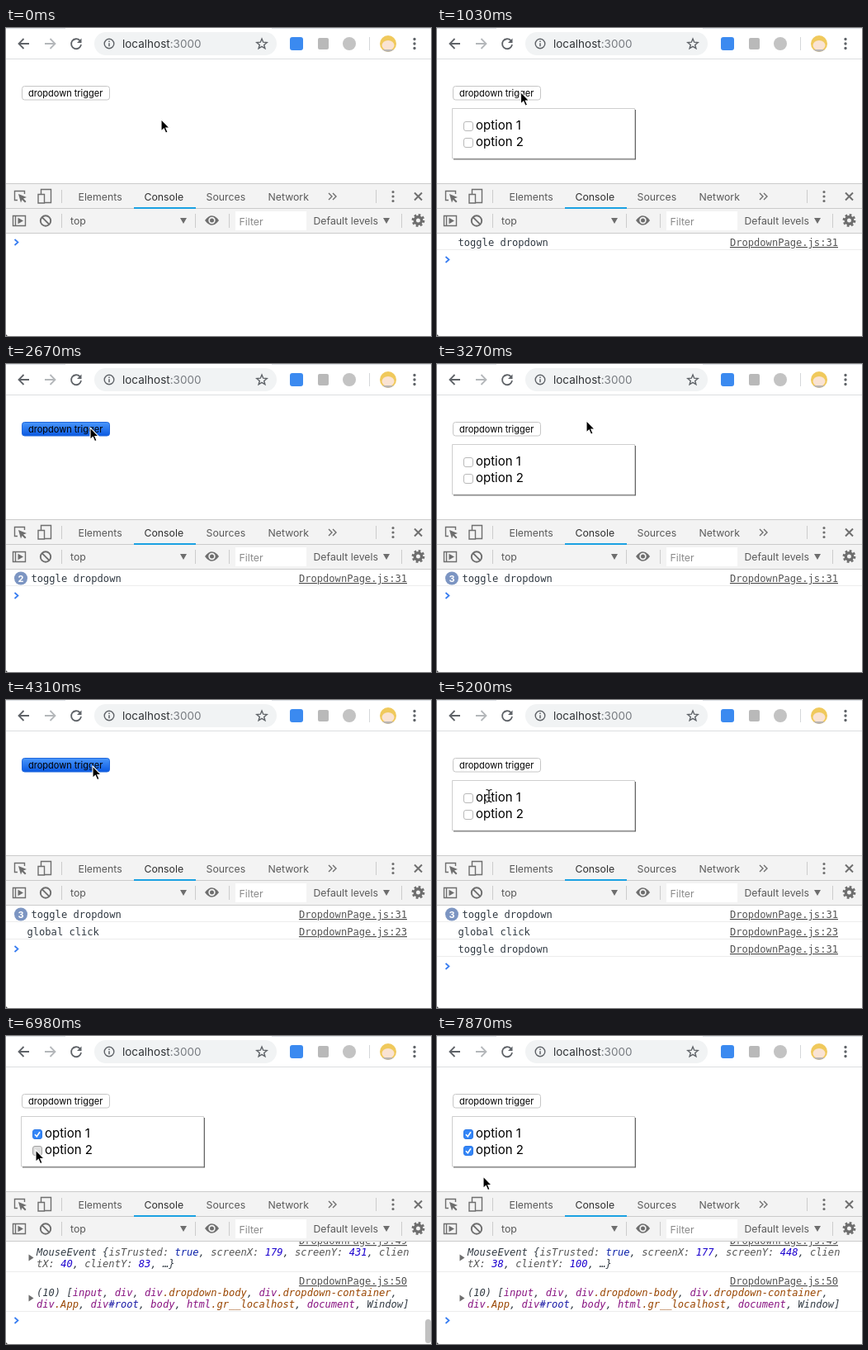
Animation of 515x373 px, one loop 8000 ms. Source, as an HTML page:

```html
<!DOCTYPE html>
<html lang="en">
<head>
<meta charset="utf-8">
<title>Dropdown and console</title>
<style>
  html, body { margin: 0; width: 100%; height: 100%; overflow: hidden; background: #fff; }
  svg { display: block; width: 100vw; height: 100vh; }
  text { white-space: pre; font-family: Inter, Roboto, sans-serif; }
  .ui { font-size: 12.3px; fill: #5a5a5a; }
  .mono, .mono text { font: 12.1px "DejaVu Sans Mono", "Liberation Mono", monospace; fill: #303942; }
  .mono .obj { font-style: italic; }
  .mono .link { fill: #545454; text-anchor: end; text-decoration: underline; }
  .key { fill: #565656; }
  .val { fill: #1c00cf; }
  .bool { fill: #0d22aa; }
  .tag { fill: #881280; }
  .cls { fill: #994500; }
  .id { fill: #1a1aa6; }
  .line { fill: none; stroke: #5f6368; stroke-width: 1.8; }
  .tool { fill: none; stroke: #6e6e6e; stroke-width: 1.4; }
  .solid { fill: #6e6e6e; }
  .sep { stroke: #ccc; }
  .rule { stroke: #ececec; }
</style>
</head>
<body>
<svg viewBox="0 0 515 373" preserveAspectRatio="none">
  <defs>
    <linearGradient id="blue" x2="0" y2="1">
      <stop offset="0" stop-color="#4a97fb"/><stop offset="1" stop-color="#0a59e2"/>
    </linearGradient>
    <filter id="soft" x="-5%" y="-10%" width="110%" height="120%"><feGaussianBlur stdDeviation=".6"/></filter>
    <clipPath id="pane"><path d="M0 249H515V373H0z"/></clipPath>
    <clipPath id="face"><circle cx="463" cy="19" r="10"/></clipPath>
  </defs>
  <rect width="515" height="373" fill="#fff"/>

  <!-- browser bar -->
  <path d="M0 0H72V1H0zM322 0H515V1H322z" fill="#dee1e6"/>
  <path d="M0 37.5H515" stroke="#dcdee0"/>
  <path class="line" d="M28 19H15.5M21.5 13L15.500 19L21.500 25"/>
  <path class="line" d="M47 19H59.500M53.500 13L59.500 19L53.500 25" style="stroke:#b4b7ba"/>
  <path class="line" d="M89.500 15.200A6 6 0 1 0 91 20"/>
  <path d="M91.500 12.500V18H86z" fill="#5f6368"/>
  <rect x="107" y="5" width="221" height="28" rx="14" fill="#f1f3f4"/>
  <circle class="line" cx="125" cy="19" r="5.800" style="stroke-width:1.400"/>
  <path d="M125 18.200V22.200M125 15.500V17" stroke="#5f6368" stroke-width="1.500"/>
  <text x="141" y="24" font-size="13.5" fill="#303336">localhost<tspan fill="#777b80">:3000</tspan></text>
  <path class="line" style="stroke-width:1.400" d="M310 13L311.700 17.200L316.200 17.500L312.700 20.400L313.900 24.800L310 22.400L306.100 24.800L307.300 20.400L303.800 17.500L308.300 17.200z"/>
  <rect x="344" y="11" width="16" height="16" rx="3" fill="#3b8af0"/>
  <rect x="378" y="12" width="13" height="14" rx="2" fill="#b9b9b9"/>
  <circle cx="416" cy="19" r="8" fill="#c3c3c3"/>
  <path d="M440.500 11V27" stroke="#d5d7d9"/>
  <g clip-path="url(#face)">
    <path d="M453 9H473V29H453z" fill="#f0c95c"/>
    <ellipse cx="463" cy="21" rx="7.500" ry="6" fill="#fae3d3"/>
    <path d="M453 26H473V29H453z" fill="#b9b5b3"/>
  </g>
  <path d="M495 13.500V13.510M495 19V19.010M495 24.500V24.510" stroke="#5f6368" stroke-width="3.400" stroke-linecap="round"/>

  <!-- page -->
  <rect id="btn" x="19.500" y="70.500" width="106" height="16.500" rx="3"/>
  <text x="27" y="83" font-size="11" fill="#000">dropdown trigger</text>
  <g id="menu">
    <path d="M20 99H241V159.500H20z" fill="#666" filter="url(#soft)"/>
    <path d="M18.500 97.500H239.500V158H18.500z" fill="#fff" stroke="#cfcfcf"/>
    <g id="boxes"></g>
    <text x="47" y="123" font-size="15">option 1</text>
    <text x="47" y="143" font-size="15">option 2</text>
  </g>

  <!-- panel bars -->
  <path d="M0 188H515V249H0z" fill="#f3f3f3"/>
  <path d="M0 188.500H515M0 218.500H515M0 248.500H515" stroke="#cbcbcb"/>
  <path d="M155 217H230V219H155z" fill="#1ba1e2"/>
  <path class="sep" d="M67.500 196V212M448.500 196V212M67.500 225V242M229.500 225V242M270.500 225V242M479.500 225V242"/>
  <path class="tool" d="M14 208.500H10.500V197.500H22.500V201"/>
  <path class="solid" d="M15 201L25 205L21 206.500L24.500 210L23 211.500L19.500 208L18 211.500z"/>
  <path class="tool" d="M42.500 201V195.500H54.500V211.500H47M39 201.500H46.500V212H39z"/>
  <path class="tool" d="M391 200L395 204L391 208M396 200L400 204L396 208" stroke-width="1.600"/>
  <path d="M469 198.500V198.510M469 204V204.010M469 209.500V209.510" stroke="#6e6e6e" stroke-width="3.200" stroke-linecap="round"/>
  <path class="tool" d="M495 199.500L504 208.500M504 199.500L495 208.500" style="stroke-width:2"/>
  <g class="ui">
    <text x="87.500" y="209">Elements</text>
    <text x="167.500" y="209" fill="#303030">Console</text>
    <text x="242.500" y="209">Sources</text>
    <text x="317.500" y="209">Network</text>
    <text x="78" y="238">top</text>
    <text x="372.500" y="238">Default levels</text>
  </g>
  <path class="tool" d="M8.500 227.500H23.500V239.500H8.500zM11.500 227.500V239.500"/>
  <path class="solid" d="M14.500 229.800L21 233.500L14.500 237.200z"/>
  <g class="tool" style="stroke-width:1.900"><circle cx="48" cy="233.500" r="6.200"/><path d="M43.600 229.100L52.400 237.900"/></g>
  <path class="solid" d="M211 230H219L215 237zM457 230H465L461 237z"/>
  <path class="solid" d="M241 233Q249.500 221.500 258 233Q249.500 244.500 241 233z"/>
  <circle cx="249.500" cy="233" r="4.200" fill="#f3f3f3"/><circle class="solid" cx="249.500" cy="233" r="2.500"/>
  <path d="M278 222H364V245H278z" fill="#fff"/>
  <text class="ui" x="282.500" y="239" style="fill:#8a8a8a">Filter</text>
  <g class="tool"><circle cx="499.500" cy="233" r="4.200" style="stroke-width:3.400"/>
    <circle cx="499.500" cy="233" r="6.600" style="stroke-width:2.600;stroke-dasharray:2.700 2.484"/></g>

  <g id="console" class="mono" clip-path="url(#pane)"></g>
  <path d="M0 371V373H2z" fill="#444"/>
  <path id="arrow" d="M0 0V14.500L3.300 11.500L5.600 16.700L8 15.600L5.800 10.600H10.300z" stroke="#fff" stroke-width="1.100"/>
  <g id="beam" fill="none">
    <path d="M-3.500 -7.500Q0 -7.500 0 -5Q0 -7.500 3.500 -7.500M0 -5V5M-3.500 7.500Q0 7.500 0 5Q0 7.500 3.500 7.500M-2 2.500H2" stroke="#fff" stroke-width="2.600"/>
    <path d="M-3.500 -7.500Q0 -7.500 0 -5Q0 -7.500 3.500 -7.500M0 -5V5M-3.500 7.500Q0 7.500 0 5Q0 7.500 3.500 7.500M-2 2.500H2" stroke="#111" stroke-width="1.200"/>
  </g>
</svg>
<script>
const LOOP = 8000;
const $ = id => document.getElementById(id);

// Each step: time, pointer x, pointer y, changed state (the rest carries over).
const steps = [
  [0, 188, 110.5, { press: 0, open: 0, toggles: 0, lines: 0, log: 0, box1: 0, box2: 0, bar: 0, beam: 0 }],
  [450, 170, 103], [600, 134, 89], [740, 105, 79],
  [890, 101.5, 77.5, { press: 1 }],
  [1030, 101.5, 77.5, { press: 0, open: 1, toggles: 1, lines: 1 }],
  [1180, 101.5, 78],
  [1630, 102, 77],
  [1930, 102, 77, { press: 1 }],
  [2070, 102, 77, { press: 0, open: 0, toggles: 2 }],
  [2670, 102, 77, { press: 1 }],
  [2820, 102, 77, { press: 0, open: 1, toggles: 3 }],
  [2970, 122, 74], [3120, 163, 70], [3270, 181, 68.5],
  [3570, 181, 68.5, { open: 0, lines: 2 }],
  [3870, 163, 71], [4010, 125, 77], [4160, 106, 79.5],
  [4300, 105, 80, { press: 1 }],
  [4450, 105, 80, { press: 0, open: 1, lines: 3 }],
  [4750, 96, 88], [4900, 70, 105],
  [5050, 52, 115, { beam: 1 }],
  [5200, 63, 116],
  [5650, 63, 116, { log: 1, bar: 1 }],
  [5800, 61, 116.5], [5950, 52, 118],
  [6090, 40, 120.5, { beam: 0 }],
  [6240, 38, 121, { box1: 1 }],
  [6390, 38, 121, { box1: 2, log: 2 }],
  [6540, 37.5, 128], [6690, 36.5, 135], [6840, 36, 138],
  [6980, 36, 138, { box2: 1 }],
  [7130, 36, 138, { box2: 2, log: 3 }],
  [7280, 38, 143], [7430, 45, 155],
  [7570, 52, 165, { bar: .5 }],
  [7720, 55, 169, { bar: 0 }],
  [7870, 56, 170]
];

// Clicked element, screen and client position of each logged event.
const events = [["span", 204, 425, 65, 77], ["input", 179, 431, 40, 83], ["input", 177, 448, 38, 100]];

const span = (cls, s) => `<tspan class="${cls}">${s}</tspan>`;
const text = (x, y, s, cls = "") => `<text x="${x}" y="${y}" class="${cls}">${s}</text>`;
const link = (y, row) => text(486, y, "DropdownPage.js:" + row, "link");
const rule = y => `<path class="rule" d="M0 ${y}H515"/>`;
const prompt = y => `<path d="M10.500 ${y - 3.5}L14.500 ${y}L10.500 ${y + 3.5}" fill="none" stroke="#367cf1" stroke-width="1.700"/>`;
const fold = y => `<path class="solid" d="M27.500 ${y - 4}L33.500 ${y}L27.500 ${y + 4}z"/>`;
const num = (key, n) => span("key", key + ": ") + span("val", n);

function tags(list) {
  return list.split(" ").map(s => {
    const [, name, rest] = s.match(/^(\w+)(.*)$/);
    return span("tag", name) + (rest && span(rest[0] === "#" ? "id" : "cls", rest));
  }).join(", ");
}

function eventLog(n) {
  const [el, sx, sy, cx, cy] = events[n - 1];
  return link(252, 49) + fold(268.5) +
    text(37, 266, `MouseEvent {${span("key", "isTrusted: ")}${span("bool", "true")}, ${num("screenX", sx)}, ${num("screenY", sy)}, ${span("key", "clien")}`, "obj") +
    text(37, 280, `${num("tX", cx)}, ${num("clientY", cy)}, …}`, "obj") +
    rule(285.5) + link(301, 50) + fold(317.5) +
    text(37, 315, `(10) [${tags(el + " div div.dropdown-body div.dropdown-container")},`, "obj") +
    text(37, 329, `${tags("div.App div#root body html.gr__localhost document")}, Window]`, "obj") +
    rule(333.5) + prompt(344.5);
}

function plainLog({ lines, toggles }) {
  const rows = [["toggle dropdown", 31], ["global click", 23], ["toggle dropdown", 31]];
  let out = "";
  rows.slice(0, lines).forEach(([s, row], i) => {
    const y = 264 + 21 * i, badge = i === 0 && toggles > 1;
    if (badge) out += `<circle cx="18" cy="259.500" r="8" fill="#7c95c2"/>
      <text x="18" y="263.500" text-anchor="middle" style="font:bold 11px Inter,sans-serif;fill:#fff">${toggles}</text>`;
    out += text(badge ? 30.5 : 25.5, y, s) + link(y, row) + rule(y + 4.5);
  });
  return out + prompt(259.5 + 21 * lines);
}

function scrollBar({ log, bar }) {
  const h = 124 * 124 / (70 + 230 * log);
  return `<rect x="508" y="${372 - h}" width="7" height="${h}" rx="3.500" fill="#c1c1c1" opacity="${bar}"/>`;
}

function checkBox(y, state) {
  const fill = ["#fff", "#dedede", "#3486f7"][state];
  const edge = ["#b9b9b9", "#a2a2a2", "#2a78e8"][state];
  return `<rect x="32.500" y="${y}" width="11" height="11" rx="2.500" fill="${fill}" stroke="${edge}"/>` +
    (state === 2 ? `<path d="M35 ${y + 5.7}L37.300 ${y + 8.2}L41 ${y + 2.8}" fill="none" stroke="#fff" stroke-width="1.600"/>` : "");
}

let state = {};
const frames = steps.map(([t, x, y, change]) => {
  state = { ...state, ...change };
  return { ...state, t, x, y };
});

function draw(s) {
  $("btn").setAttribute("fill", s.press ? "url(#blue)" : "#fff");
  $("btn").setAttribute("stroke", s.press ? "#2168dc" : "#c6c6c6");
  $("menu").style.display = s.open ? "" : "none";
  $("boxes").innerHTML = checkBox(113.5, s.box1) + checkBox(133.5, s.box2);
  $("console").innerHTML = s.log ? eventLog(s.log) + scrollBar(s) : plainLog(s);
  $("arrow").style.display = s.beam ? "none" : "";
  $("beam").style.display = s.beam ? "" : "none";
  $(s.beam ? "beam" : "arrow").setAttribute("transform", `translate(${s.x} ${s.y})`);
}

let shown;
const start = performance.now();
function tick() {
  const t = (performance.now() - start) % LOOP;
  const now = frames.filter(f => f.t <= t).pop();
  if (now !== shown) draw(shown = now);
  requestAnimationFrame(tick);
}
tick();
</script>
</body>
</html>
```
